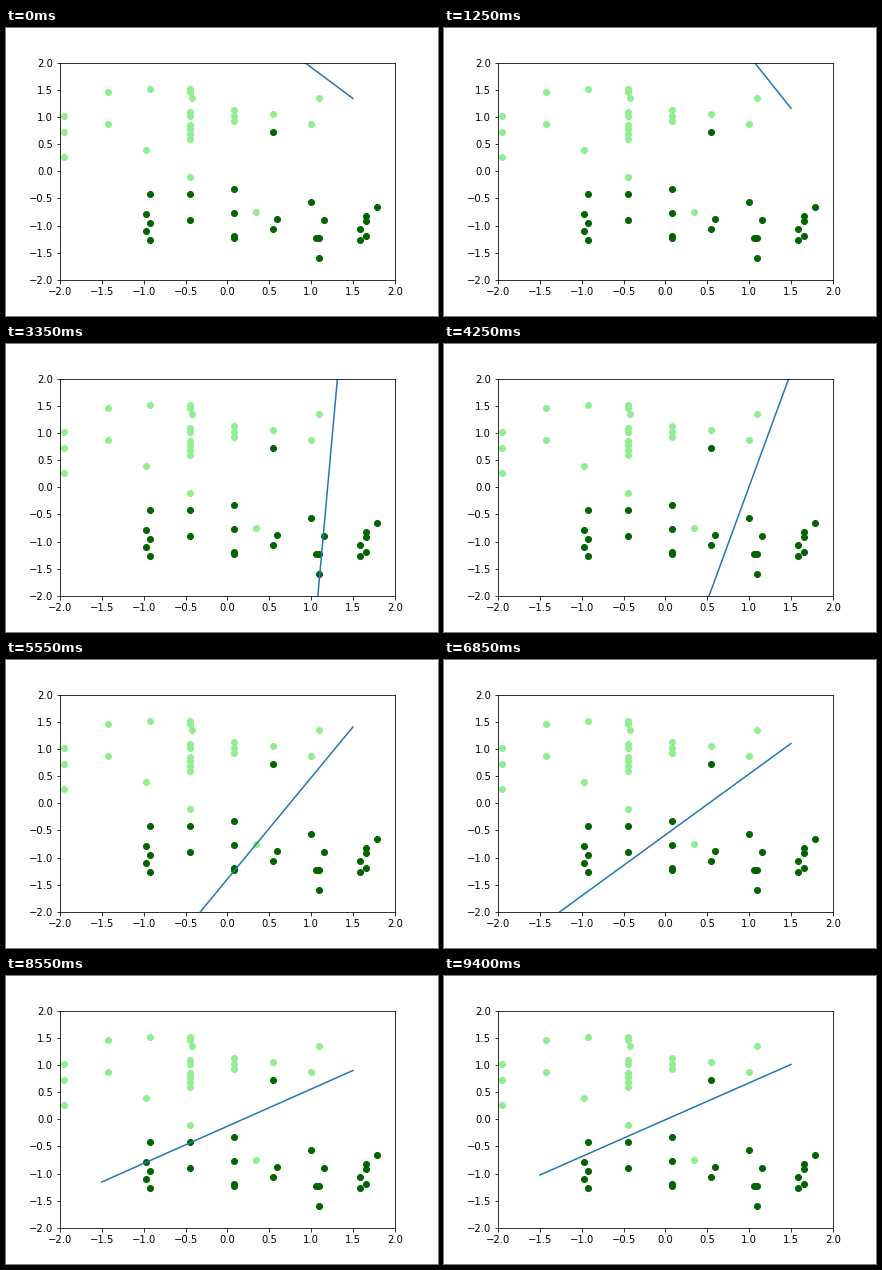
Recreate the animation shown at these times as a matplotlib script. Size 432 px wide and 288 px high, loop 9450 ms.

```python
import numpy as np
import matplotlib.pyplot as plt
from matplotlib.animation import FuncAnimation

FRAMES, INTERVAL = 189, 50
ENDS = np.array([-1.5, 1.5])

# Key poses of the boundary x = offset + tilt * y: (step, tilt, offset)
POSES = [(0, -0.87, 2.665), (19, -0.618, 2.28), (48, -0.131, 1.409),
         (85, 0.238, 0.997), (111, 0.536, 0.747), (137, 0.892, 0.519),
         (171, 1.463, 0.187), (188, 1.475, 0.0125)]


def string(x, top, bottom=None, n=1, sway=0.0):
    """Evenly spaced dots down a column, every second one moved by sway."""
    y = np.linspace(top, top if bottom is None else bottom, n)
    return np.column_stack([x + sway * (np.arange(n) % 2), y])


def scatter(color, *strings):
    pts = np.vstack(strings)
    ax.scatter(pts[:, 0], pts[:, 1], color=color)


def boundary(step):
    steps, tilts, offsets = zip(*POSES)
    tilt = np.interp(step, steps, tilts)
    offset = np.interp(step, steps, offsets)
    return (ENDS - offset) / tilt


def update(step):
    line.set_data(ENDS, boundary(step))
    return (line,)


fig, ax = plt.subplots(figsize=(6, 4), dpi=72)
fig.subplots_adjust(left=0.125, right=0.9, bottom=0.125, top=0.88)

scatter("lightgreen",
        string(-1.95, 1.017, 0.723, 2),
        string(-1.95, 0.263),
        string(-1.427, 1.45, 0.875, 2),
        string(-0.925, 1.514, 0.39, 2, sway=-0.048),
        string(-0.443, 1.51, 1.46, 2),
        string(-0.417, 1.345),
        string(-0.443, 1.095, 1.017, 2),
        string(-0.443, 0.857, 0.594, 4),
        string(-0.443, -0.114),
        string(0.082, 1.13, 0.92, 3),
        string(0.34, -0.758),
        string(0.55, 1.045),
        string(1.095, 1.345, 0.875, 2, sway=-0.095))

scatter("darkgreen",
        string(-0.925, -0.427),
        string(-0.973, -0.79, -1.264, 4, sway=0.048),
        string(-0.443, -0.427, -0.905, 2),
        string(0.082, -0.335, -1.185, 3),
        string(0.082, -1.22),
        string(0.55, 0.718, -1.071, 2),
        string(0.598, -0.887),
        string(1.0, -0.574, -0.905, 2, sway=0.16),
        string(1.06, -1.22),
        string(1.095, -1.22, -1.59, 2),
        string(1.66, -0.815, -0.908, 2),
        string(1.66, -1.185),
        string(1.59, -1.071, -1.264, 2),
        string(1.79, -0.666))

line, = ax.plot(ENDS, boundary(0), color="tab:blue", lw=1.5)
ax.set_xlim(-2, 2)
ax.set_ylim(-2, 2)

anim = FuncAnimation(fig, update, frames=FRAMES, interval=INTERVAL,
                     init_func=lambda: update(0), repeat=True, repeat_delay=0)
plt.show()
```
